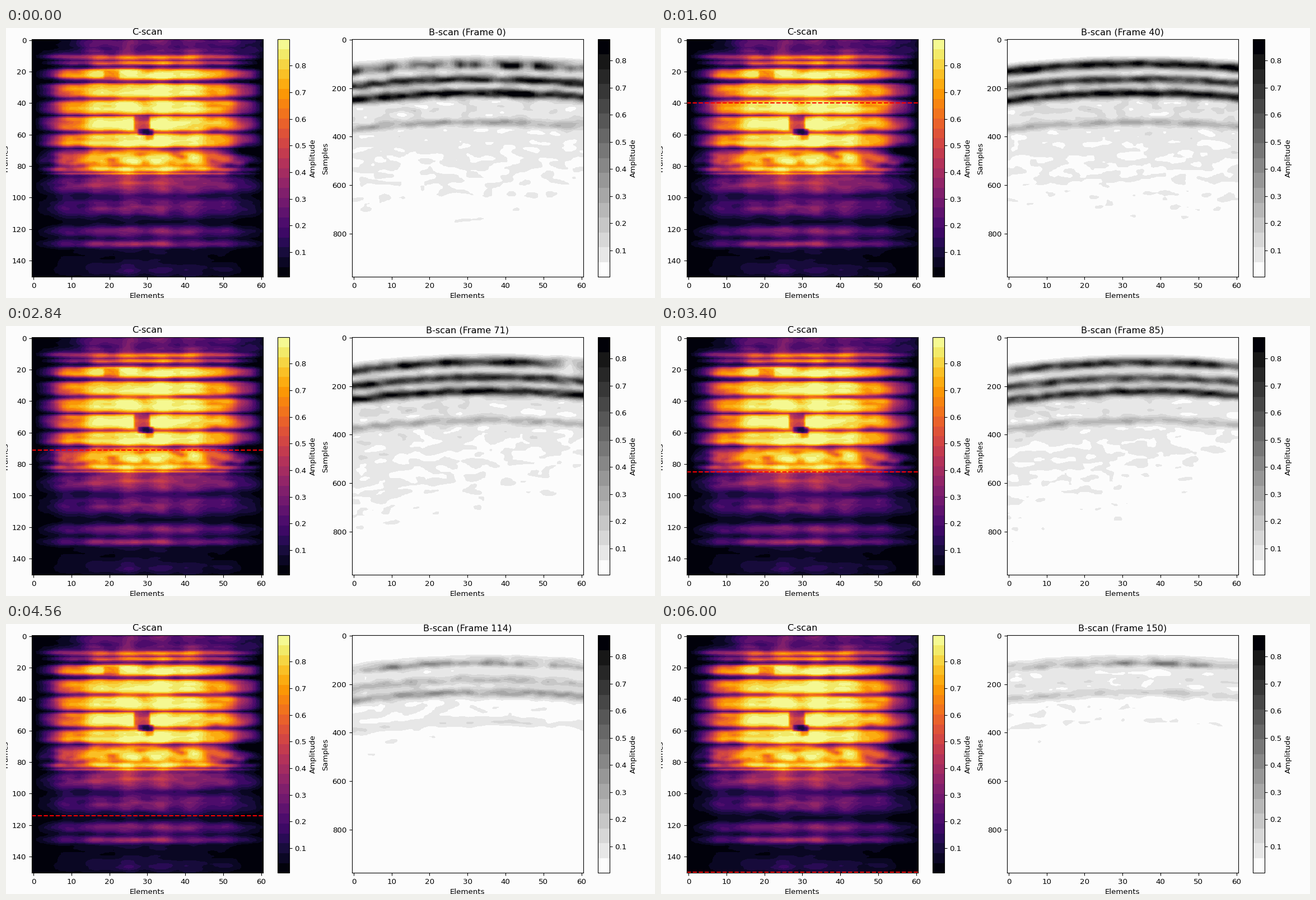
A matplotlib script that plays this animation: 1159x483 px, repeating every 6040 ms.

```python
import numpy as np
import matplotlib.pyplot as plt
from matplotlib.animation import FuncAnimation
from matplotlib.colors import ListedColormap

W, H, DPI = 1159, 483, 100
FRAMES, ELEMENTS, SAMPLES, STEP = 151, 61, 978, 4
SCALE = 0.966  # text and strokes relative to the matplotlib defaults
rng = np.random.default_rng(7)
plt.rcParams.update({
    "font.family": "DejaVu Sans", "font.size": 10 * SCALE,
    "axes.titlepad": 6 * SCALE, "axes.labelpad": 4 * SCALE,
    "xtick.major.pad": 3.5 * SCALE, "ytick.major.pad": 3.5 * SCALE,
})

frame = np.arange(FRAMES)[:, None]
col = np.arange(ELEMENTS)[None, :]
depth = np.arange(0, SAMPLES, STEP)[:, None] + STEP / 2


def smooth_noise(shape, passes):
    """Unit-variance noise, blurred a given number of times along each axis."""
    n = rng.standard_normal(shape).astype(np.float32)
    for axis, count in enumerate(passes):
        for _ in range(count):
            n = 0.5 * n + 0.25 * (np.roll(n, 1, axis) + np.roll(n, -1, axis))
    return n / n.std()


def bump(x, centre, width, power=2):
    return np.exp(-0.5 * np.abs((x - centre) / width) ** power)


def ramp(x, lo, hi):
    t = np.clip((x - lo) / (hi - lo), 0, 1)
    return t * t * (3 - 2 * t)


def mix(a, b, t):
    return a + (b - a) * t


# Sensitivity across the probe, and gain along the scan
taper = np.sin(np.pi * (col + 0.3) / 61.6) ** 1.5
wedge = 1 - 0.95 * ramp(col, 44, 57) * bump(frame, 71.5, 2.6)


def scan_gain():
    """Broad bands at a regular pitch, plus narrow ones before and faint ones after."""
    pitch = 10.6
    offset = (frame - 21.5 + pitch / 2) % pitch - pitch / 2
    main = ramp(frame, 16, 18.5) * (1 - ramp(frame, 77, 83))
    size = mix(2.5, 3.5, ramp(frame, 22, 30))
    strength = mix(3.6, 2.0, ramp(frame, 67, 72))
    g = 0.08 + 0.27 * (1 - ramp(frame, 86, 100))
    g = g + strength * main * bump(offset, 0, size, 4)
    for centre, width, peak in ((11, 1, 1.1), (14.6, .8, 1.1), (79, 2, .9), (82.3, 1, 2.1),
                                (85, .5, 1.3), (93, 5, .35), (107, 3.5, .36),
                                (122, 2.3, .4), (129.5, 1.6, .42), (145, 2.5, .08)):
        g = g + peak * bump(frame, centre, width)
    return g * (1 + 0.08 * smooth_noise((FRAMES, 1), (1,)))


gain = scan_gain()


def make_cscan():
    spread = 1 - 0.65 * (1 - ramp(frame, 6, 14)) - 0.45 * ramp(frame, 84, 92)
    g = gain * taper ** spread * wedge
    g = g * (1 + 0.14 * np.cos(2 * np.pi * (col - 25) / 8.5))
    mottled = 0.08 + 0.2 * bump(frame, 78, 4)
    g *= np.clip(1 + 0.1 * smooth_noise((FRAMES, ELEMENTS), (1, 8))
                 + mottled * smooth_noise((FRAMES, ELEMENTS), (4, 2)), 0.2, 2)
    # Shadowed spots: frame, half height, element, half width, strength
    for f, h, c, w, s in ((53, 4.5, 28.5, 2, .8), (58.5, 2, 29.5, 1.7, .85),
                          (61.5, 2.2, 30.3, 1.2, .55), (22, 2.6, 20.5, 2, .5),
                          (0, 8, 0, 11, .7)):
        g *= 1 - s * bump(frame, f, h, 8) * bump(col, c, w, 8)
    return 0.9 * (1 - np.exp(-g))


cscan = make_cscan()
front = 0.9 * (1 - np.exp(-gain * taper ** 0.08 * wedge))
texture = smooth_noise((FRAMES, len(depth), ELEMENTS), (5, 7, 2))
ripple = smooth_noise((FRAMES, ELEMENTS), (4, 2))


def bscan(f):
    late = ramp(f, 80, 99)
    fading = ramp(f, 114, 150)
    weak = 1 - front[f]

    # Depth measured from the curved surface
    apex = 33 + 3 * bump(f, 80, 25)
    left = 28 + 10 * bump(f, 90, 30)
    side = np.where(col < apex, left * ((apex - col) / apex) ** 2,
                    17 * ((col - apex) / (60 - apex)) ** 2)
    z = depth - side - 14 * late

    jitter = 1 + (0.04 + 0.22 * weak) * ripple[f]
    sides = 1 - 0.5 * late * (1 - np.sqrt(taper))
    echo = (0.23 + 0.68 * front[f]) * jitter * sides * bump(z, 102, 14 - 4 * late)
    echo += 0.13 * weak * (bump(z, 80, 11) + 0.4 * bump(z, 128, 12))
    for centre, width, early, after, end in ((165 + 5 * late, 13 + 3 * late, .60, .17, .06),
                                             (222, 13, .70, .25, .11),
                                             (342, 12, .18, .05, .015)):
        echo += mix(mix(early, after, late), end, fading) * bump(z, centre, width)
    echo *= 1 + (0.05 + 0.10 * weak) * texture[f]

    # Near-surface ringing while the probe settles
    settling = np.exp(-f / 7)
    hits = 0.22 * np.clip(ripple[f] - 0.5, 0, 1.5) + 0.45 * bump(col, 0, 1.5)
    echo += settling * hits * bump(z, 110, 10)

    level = 0.1 * np.exp(-(z - 250) / 480) * ramp(z, 80, 220)
    level = level * mix(mix(1, 0.5, late), 0.4, fading)
    level = level * (1 + 0.2 * ramp(f, 40, 71) * (1 - col / 30))
    waves = 0.13 * np.cos(2 * np.pi * (z - 342) / 58.5)
    return np.clip(echo + level * (1 + 0.24 * texture[f] + waves), 0, 0.87)


def banded(name, n):
    return plt.get_cmap(name)((np.arange(n) + 0.5) / n)


grays = banded("gray_r", 16)
grays[0, :3], grays[-1, :3] = 252 / 255, (0.005, 0.005, 0.03)

fig = plt.figure(figsize=(W / DPI, H / DPI), dpi=DPI, facecolor="#fcfcfc")


def panel(x0, x1, y0=20.4, y1=445.4):
    return fig.add_axes([x0 / W, 1 - y1 / H, (x1 - x0) / W, (y1 - y0) / H])


def scan_panel(x, data, rows, colors, limits, title, ylabel, tick_step):
    ax = panel(x, x + 413.3)
    image = ax.imshow(data, cmap=ListedColormap(colors), vmin=limits[0], vmax=limits[1],
                      aspect="auto", interpolation="hanning",
                      extent=(-0.5, ELEMENTS - 0.5, rows - 0.5, -0.5))
    ax.set(xlabel="Elements", ylabel=ylabel, xticks=range(0, 61, 10),
           yticks=range(0, rows - 5, tick_step))
    heading = ax.set_title(title)
    bar = fig.colorbar(image, cax=panel(x + 439, x + 460.2), label="Amplitude")
    bar.set_ticks(np.arange(1, 9) / 10)
    return ax, image, heading


ax_c, _, _ = scan_panel(45.8, cscan, FRAMES, banded("inferno", 24), (0.0066, 0.8987),
                        "C-scan", "Frames", 20)
ax_b, section, heading = scan_panel(617.6, bscan(0), SAMPLES, grays, (0.002, 0.878),
                                    "B-scan (Frame 0)", "Samples", 200)
cursor = ax_c.axhline(0, color="red", ls="--", lw=1.5 * SCALE, visible=False)


def update(f):
    section.set_data(bscan(f))
    heading.set_text(f"B-scan (Frame {f})")
    cursor.set_ydata([f, f])
    cursor.set_visible(f > 0)
    return section, heading, cursor


anim = FuncAnimation(fig, update, frames=FRAMES, interval=40, repeat=True, repeat_delay=0)
plt.show()
```
